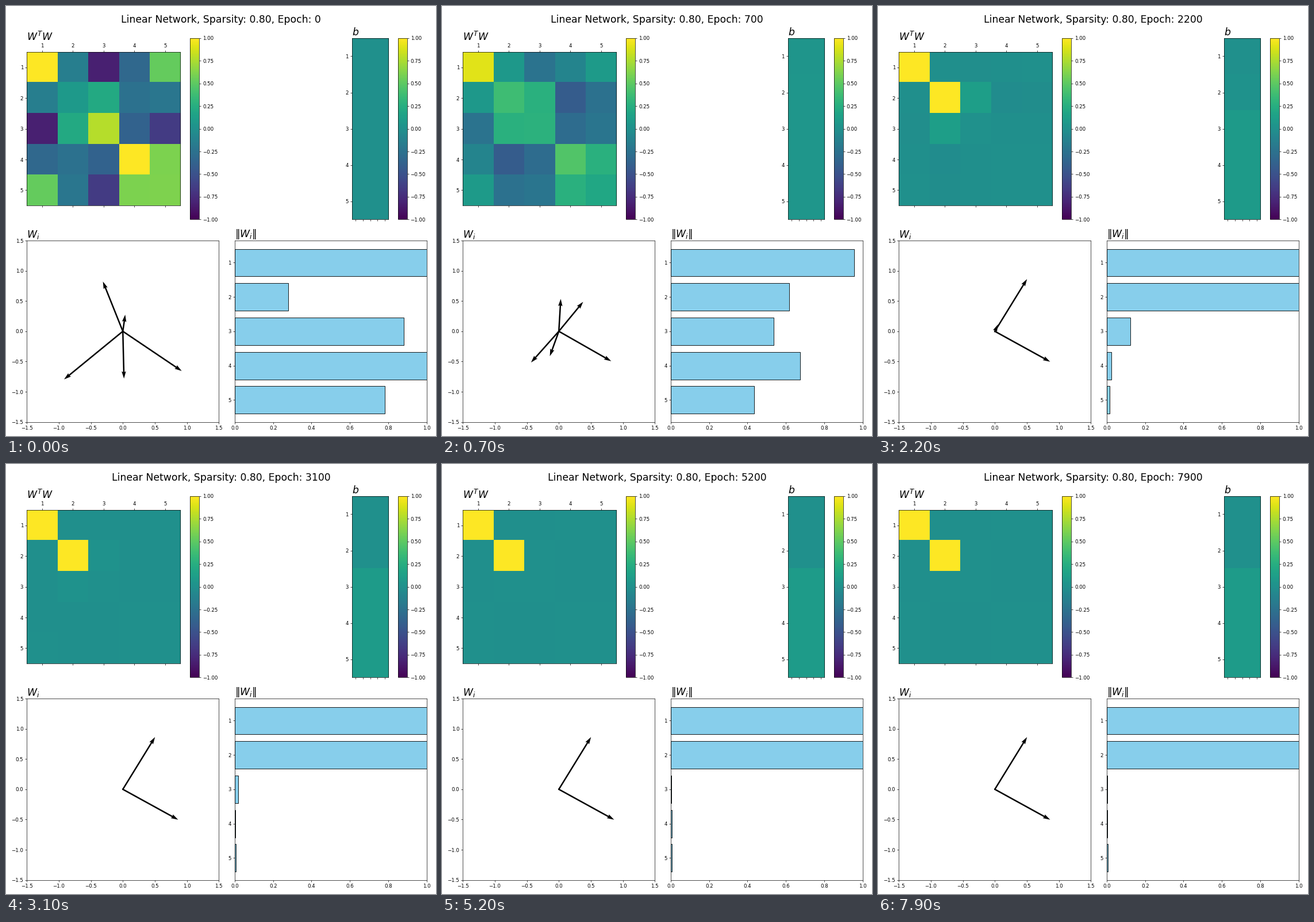
A matplotlib script for the animation above (8000 ms loop, 748x748 px).

```python
import numpy as np
import matplotlib.pyplot as plt
from matplotlib.animation import FuncAnimation

SIZE = 748
FRAMES = 80
STEP = 100  # ms per frame and epochs per frame
LABELS = range(1, 6)

t = np.arange(FRAMES)[:, None]
rng = np.random.default_rng(4)

# A damped swing: feature 1 dips in length, feature 2 overshoots its angle
swing = np.exp(-(t / 7) ** 2) * np.cos(np.pi * t / 8)

# Lengths: feature 2 grows to 1, features 3 to 5 collapse to training noise
start = np.array([0.278, 0.88, 1.215, 0.782])
goal = np.array([1, 0, 0, 0])
rate = np.array([0.082, 0.070, 0.081, 0.081])
collapse = np.array([26, 1.8, 9, 9]) * 1e-6
fading = goal + (start - goal) * np.exp(-rate * t - collapse * t ** 4)
norms = np.hstack([1 + 0.13 * swing, fading])
norms = np.maximum(norms, rng.uniform(0.001, 0.007, norms.shape))

# Angles settle on two perpendicular directions and their opposites
first = np.array([-35.5, 82.4, 110.7, 220.9, 271.3])
last = np.array([-30.2, 59.8, 60, 240, 242])
settle = np.exp(-t / np.array([4, 1, 11, 11, 6]))
settle[:, 1:2] = swing
angles = np.radians(last + (first - last) * settle)

weights = norms[:, None] * np.stack([np.cos(angles), np.sin(angles)], axis=1)

# Biases rise to the data mean, then drop again for the two kept features
bias = 0.1 * (1 - np.exp(-t / 10)) * np.ones(5)
bias[:, :2] *= np.exp(-(t / [10, 20]) ** 4)


def heat_map(ax, data, title):
    image = ax.matshow(data, cmap="viridis", vmin=-1, vmax=1)
    ax.set_yticks(range(5), LABELS)
    ax.set_title(title, loc="left", fontsize=20)
    fig.colorbar(image, ax=ax, ticks=np.linspace(-1, 1, 9))
    return image


fig, ((gram_ax, bias_ax), (arrow_ax, norm_ax)) = plt.subplots(
    2, 2, figsize=(12, 12), dpi=SIZE / 12, facecolor="white")
heading = fig.suptitle("Linear Network, Sparsity: 0.80, Epoch: 0", fontsize=20)

gram = heat_map(gram_ax, weights[0].T @ weights[0], "$W^TW$")
gram_ax.set_xticks(range(5), LABELS)

column = heat_map(bias_ax, bias[0][:, None], "$b$")
bias_ax.xaxis.tick_bottom()
bias_ax.set_xticks(np.linspace(-0.4, 0.4, 5), [""] * 5)

arrow_ax.set_title("$W_i$", loc="left", fontsize=20)
arrow_ax.set(xlim=(-1.5, 1.5), ylim=(-1.5, 1.5))

norm_ax.set_title(r"$\|W_i\|$", loc="left", fontsize=20)
bars = norm_ax.barh(LABELS, norms[0], color="skyblue", edgecolor="black")
norm_ax.set(xlim=(0, 1), ylim=(5.64, 0.36), yticks=LABELS)

fig.tight_layout()
# Arrow widths depend on the final axes size
arrows = arrow_ax.quiver(np.zeros(5), np.zeros(5), *weights[0],
                         angles="xy", scale_units="xy", scale=1)
arrow_ax.set(xlim=(-1.5, 1.5), ylim=(-1.5, 1.5))


def update(i):
    w = weights[i]
    heading.set_text(f"Linear Network, Sparsity: 0.80, Epoch: {i * STEP}")
    gram.set_data(w.T @ w)
    column.set_data(bias[i][:, None])
    arrows.set_UVC(*w)
    for bar, n in zip(bars, norms[i]):
        bar.set_width(n)
    return heading, gram, column, arrows, *bars


anim = FuncAnimation(fig, update, frames=FRAMES, interval=STEP,
                     repeat=True, repeat_delay=0, blit=False)
plt.show()
```
